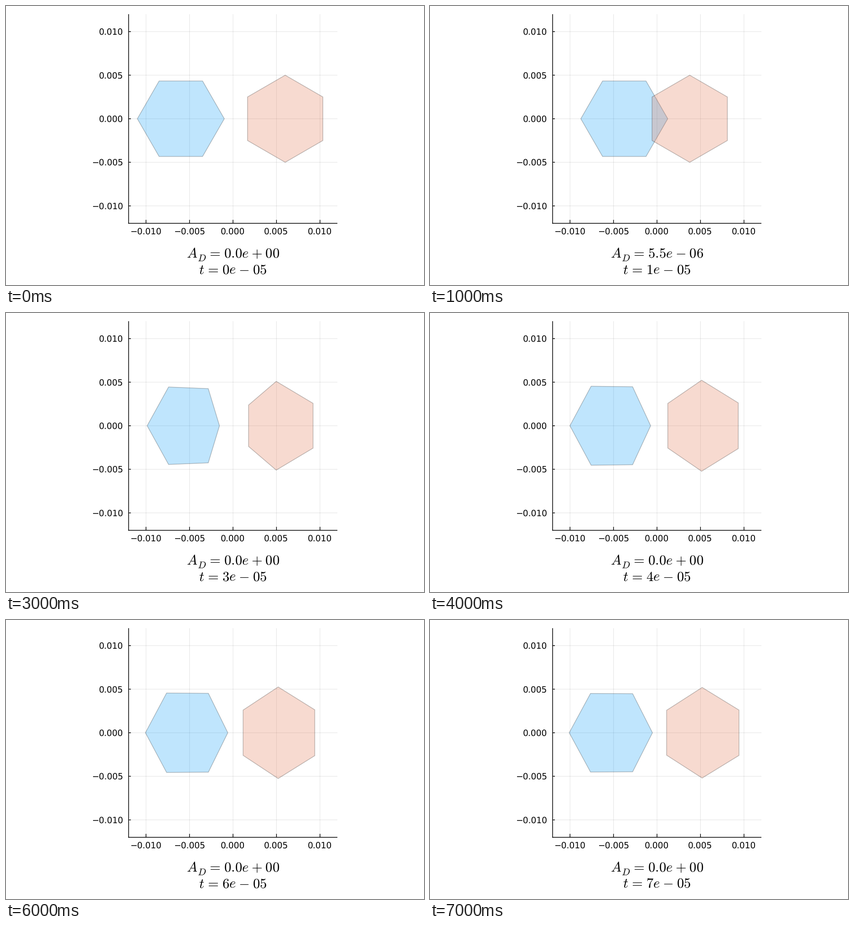
Animation of 917x611 px, one loop 8 s. Source, as a matplotlib script:

```python
import matplotlib.pyplot as plt
import numpy as np
from matplotlib.animation import FuncAnimation
from matplotlib.patches import Polygon

W, H, DPI = 917, 611, 128
CX, CY = 498, 246.9        # pixel position of the data origin
HALF = 229                 # half side of the plot area
R = 95.4                   # pixels per 0.005, also the hexagon radius
STEPS = 8
MATH = 30.5                # formula size in pixels

plt.rcParams.update({
    "font.family": "DejaVu Sans",
    "mathtext.fontset": "cm",
    "text.hinting": "none",
})


def pt(px):
    return px * 72 / DPI


fig = plt.figure(figsize=(W / DPI, H / DPI), dpi=DPI, facecolor="white")
ax = fig.add_axes([0, 0, 1, 1])
ax.set_xlim(0, W)
ax.set_ylim(H, 0)
ax.axis("off")


def line(x, y, width, alpha=1.0, z=1):
    ax.plot(x, y, color="black", lw=pt(width), alpha=alpha, zorder=z,
            solid_capstyle="butt", snap=False)


def label(x, y, s, size, ha="center"):
    return ax.text(x, y, s, fontsize=pt(size), ha=ha, va="baseline",
                   color="black")


def draw_axes():
    left, right = CX - HALF, CX + HALF
    top, bottom = CY - HALF, CY + HALF
    for k in range(-2, 3):
        x, y = CX + k * R, CY - k * R
        line([x, x], [top, bottom], 1.1, 0.1)
        line([left, right], [y, y], 1.1, 0.1)
        line([x, x], [bottom, bottom - 7.5], 1.5, z=5)
        line([left, left + 5], [y, y], 1.5, z=5)
        text = f"{k * 0.005:.3f}".replace("-", "\u2212")
        label(x - 0.6, 500, text, 18.6)
        label(256.8, y + 6.9, text, 18.6, "right")
    line([left, left], [top, bottom + 0.75], 1.5, z=5)
    line([left - 0.75, right], [bottom, bottom], 1.5, z=5)


def state(t):
    """Inward shift, dent of the facing side (pixels) and swelling."""
    if t < 3:
        shift = 42.7 * t - 11.85 * t * (t - 1)
        dent = max(0, 20.8 * (t - 1))
    else:
        shift = 17 + 4.5 * 0.4 ** (t - 3)
        dent = 4 + 25.4 * 0.2 ** (t - 3)
    swell = 0.053 * np.sin(np.pi * max(0, t - 2) / 5.6)
    return shift, dent, swell


class Body:
    """A hexagon, described from its outer end (u = 0) to its inner end."""

    def __init__(self, u, h, width, outer, inward, give, rgb, z):
        self.u, self.h = np.array(u), R * np.array(h)
        self.width, self.outer = width * R, CX + outer * R
        self.inward, self.give = inward, give
        self.patch = ax.add_patch(Polygon(
            np.zeros((6, 2)), closed=True, facecolor=(*rgb, 0.25),
            edgecolor=(0, 0, 0, 0.25), lw=pt(1.5), zorder=z,
            joinstyle="miter", snap=False))

    def update(self, shift, dent, swell):
        u, dent = self.u, self.give * dent
        depth = self.width * u * (1 - swell / 2) - dent * u ** 5
        x = self.outer + self.inward * (shift + depth)
        y = self.h * (1 + swell) * (1 - 0.0035 * dent * u ** 3)
        upper = np.column_stack([x, CY - y])
        lower = np.column_stack([x, CY + y])
        self.patch.set_xy(np.vstack([upper, lower[::-1]]))


def formula(s):
    """Widen mathtext's spacing around operators, and kern 7 and point."""
    s = s.replace("=", r"\hspace{0.117}=\hspace{0.117}")
    for op in "+-":
        s = s.replace(f" {op} ", rf"\hspace{{0.053}}{op}\hspace{{0.053}}")
    s = s.replace("7.", r"7\hspace{-0.127}.\hspace{-0.2}")
    return f"${s}$"


draw_axes()
C = np.sqrt(3) / 2
bodies = [
    Body([0, 0.25, 0.75, 1], [0, C, C, 0], 2, -2.2, 1, 1,
         (0.0, 0.6056, 0.9787), 2),
    Body([0, 0.5, 1], [0.5, 1, 0.5], 2 * C, 1.2 + C, -1, 0.73,
         (0.8889, 0.4356, 0.2781), 3),
]
AREAS = {1: "5.5e - 06", 2: "7.4e - 06"}

area_text = label(497.6, 551.3, "", MATH)
time_text = label(497.2, 586.7, "", MATH)
# The subscript hangs lower than mathtext would set it.
ax.annotate("$D$", (0, 0), xycoords=area_text, xytext=(pt(24), pt(-1.4)),
            textcoords="offset points", fontsize=pt(0.7 * MATH),
            ha="left", va="baseline", annotation_clip=False)


def draw(i):
    t = i - (i > 5)        # the bodies rest for one step
    for body in bodies:
        body.update(*state(t))
    area = AREAS.get(i, "0.0e + 00")
    area_text.set_text(formula(rf"A\hspace{{0.706}}= {area}"))
    time_text.set_text(formula(f"t = {i}e - 05"))


anim = FuncAnimation(fig, draw, frames=STEPS, interval=1000,
                     init_func=lambda: draw(0), repeat=True, blit=False)
plt.show()
```
